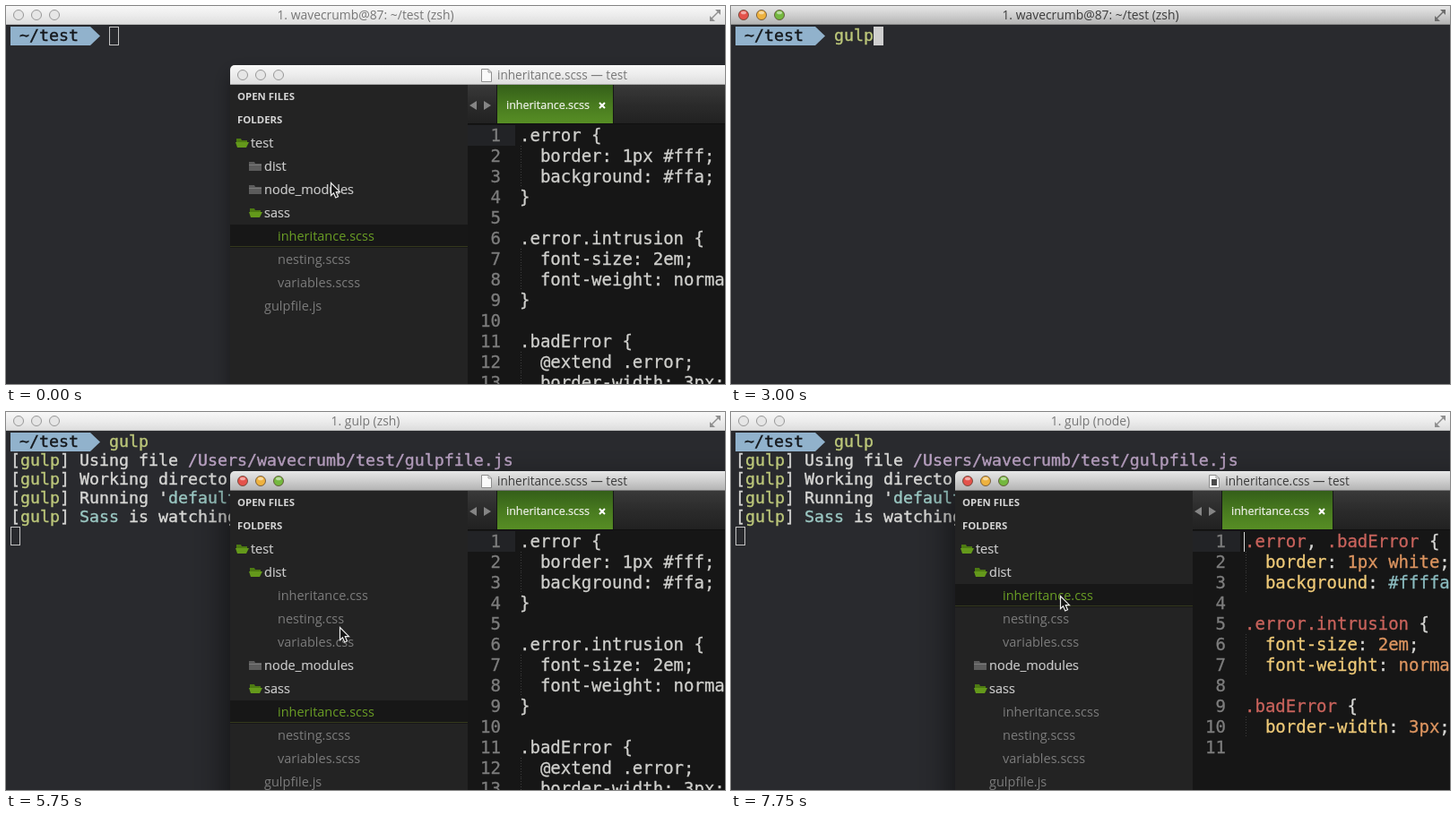
An HTML page with a canvas for the animation above (8 s loop, 802 px wide and 422 px high).

```html
<!DOCTYPE html>
<html lang="en">
<head>
<meta charset="utf-8">
<title>Watching Sass files</title>
<style>
  html, body { margin: 0; width: 100%; height: 100%; overflow: hidden; background: #292a2e; }
  canvas { display: block; }
</style>
</head>
<body>
<canvas id="stage" width="802" height="422"></canvas>
<script>
const W = 802, H = 422, LOOP = 8000, STEP = 250;
const ctx = document.getElementById('stage').getContext('2d');

const SANS = '"Open Sans", "Noto Sans", sans-serif';
const MONO = '"DejaVu Sans Mono", monospace';
const USER = 'wavecrumb';
const C = {
  white: '#d6d6d4', lime: '#bcc77a', mauve: '#bba3c4', teal: '#9ac7c2',
  red: '#c9635c', yellow: '#efca78', orange: '#dd9560', violet: '#b294bb', aqua: '#8bbcc0'
};

const SCSS = `.error {
  border: 1px #fff;
  background: #ffa;
}

.error.intrusion {
  font-size: 2em;
  font-weight: normal;
}

.badError {
  @extend .error;
  border-width: 3px;`;
const NESTING = `table.hl {
  margin: 2em 1; }
  table.hl td.ln {
    text-align: right; }

li {
  font-family: serif;
  font-weight: bold;
  font-size: 1.2em; }
`;
const INHERIT = `.error, .badError {
  border: 1px white;
  background: #ffffaa; }

.error.intrusion {
  font-size: 2em;
  font-weight: normal; }

.badError {
  border-width: 3px; }
`;
const FILES = {
  'inheritance.scss': SCSS, 'nesting.css': NESTING, 'inheritance.css': INHERIT
};

// Pointer path: time, x, y
const POINTER = [
  [[0, 362, 197], [500, 312, 182], [750, 302, 180], [1250, 187, 111], [1500, 181, 106], [2500, 181, 106]],
  [[4750, 420, 300], [5750, 372, 240], [6250, 366, 228], [6750, 366, 226], [7250, 367, 205], [7750, 367, 205]]
];

function rect(x, y, w, h, fill) {
  ctx.fillStyle = fill;
  ctx.fillRect(x, y, w, h);
}

function shade(y, h, ...stops) {
  const g = ctx.createLinearGradient(0, y, 0, y + h);
  stops.forEach((c, i) => g.addColorStop(i / (stops.length - 1), c));
  return g;
}

function poly(points, fill, stroke, width = 1) {
  ctx.beginPath();
  points.forEach(([x, y]) => ctx.lineTo(x, y));
  ctx.closePath();
  if (fill) { ctx.fillStyle = fill; ctx.fill(); }
  if (stroke) { ctx.strokeStyle = stroke; ctx.lineWidth = width; ctx.stroke(); }
}

function line(points, color, width = 1) {
  ctx.beginPath();
  points.forEach(([x, y]) => ctx.lineTo(x, y));
  ctx.strokeStyle = color;
  ctx.lineWidth = width;
  ctx.stroke();
}

// Draws text and returns its width; a thin stroke thickens the strokes a little.
function text(s, x, y, font, color, align = 'left', thick = 0) {
  ctx.font = font;
  ctx.textAlign = align;
  ctx.fillStyle = color;
  ctx.fillText(s, x, y);
  if (thick) {
    ctx.strokeStyle = color;
    ctx.lineWidth = thick;
    ctx.strokeText(s, x, y);
  }
  return ctx.measureText(s).width;
}

function runs(parts, x, y, font, thick) {
  for (const [s, color] of parts) x += text(s, x, y, font, color, 'left', thick);
}

function lights(x, y, active) {
  ['#e4524b', '#eeb23f', '#74b83f'].forEach((c, i) => {
    const cx = x + i * 20;
    ctx.beginPath();
    ctx.arc(cx, y, 5.5, 0, 7);
    ctx.fillStyle = active ? c : '#e6e6e6';
    ctx.fill();
    ctx.lineWidth = 1;
    ctx.strokeStyle = active ? 'rgba(70,45,25,.65)' : '#979797';
    ctx.stroke();
    if (!active) return;
    ctx.beginPath();
    ctx.ellipse(cx, y - 2.5, 3, 1.8, 0, 0, 7);
    ctx.fillStyle = 'rgba(255,255,255,.5)';
    ctx.fill();
  });
}

function barFill(y, h, active) {
  return active ? shade(y, h, '#e7e7e7', '#cecece', '#b1b1b1') : shade(y, h, '#f8f8f8', '#ececec', '#dcdcdc');
}

function cursor(x, y, solid) {
  if (solid) return rect(x, y, 11, 21, '#cfcfcf');
  ctx.strokeStyle = '#c4c4c4';
  ctx.lineWidth = 1;
  ctx.strokeRect(x + .5, y + .5, 10, 20);
}

function terminal(t) {
  const active = t >= 1750 && t < 4500;
  const font = '18.27px ' + MONO;
  rect(0, 0, W, H, '#292a2e');
  rect(0, 0, W, 21, barFill(0, 21, active));
  rect(0, 20, W, 1, active ? '#8d8d8d' : '#bdbdbd');
  lights(14, 10, active);
  const title = t < 3500 ? `1. ${USER}@87: ~/test (zsh)` : t < 7250 ? '1. gulp (zsh)' : '1. gulp (node)';
  text(title, 401, 15, '13.9px ' + SANS, active ? '#3c3c3c' : '#777', 'center');

  const ink = active ? '#6c6c6c' : '#8f8f8f';
  line([[787, 14], [795, 6]], ink, 1.5);
  poly([[791, 4], [797, 4], [797, 10]], ink);
  poly([[785, 11], [785, 17], [791, 17]], ink);

  poly([[5, 23], [94, 23], [105, 33.5], [94, 44], [5, 44]], '#91b2cc');
  text('~/test', 15, 39, font, '#15181c', 'left', .4);

  const typed = t < 2750 ? '' : t < 3000 ? 'gu' : 'gulp';
  text(typed, 115, 39, font, C.lime, 'left', .4);
  if (t < 3500) return cursor(115 + typed.length * 11, 23, active);

  const log = [
    [['Using file ', C.white], [`/Users/${USER}/test/gulpfile.js`, C.mauve]],
    [['Working directory changed to ', C.white], [`/Users/${USER}/test`, C.mauve]],
    [['Running ', C.white], ["'", C.white], ['default', C.teal], ["'...", C.white]],
    [['Sass', C.teal], [' is watching', C.white]]
  ];
  const count = Math.min(4, Math.floor((t - 3500) / STEP));
  log.slice(0, count).forEach((parts, i) => {
    const head = [['[', C.white], ['gulp', C.lime], ['] ', C.white]];
    runs(head.concat(parts), 5, 60 + i * 21, font, .4);
  });
  cursor(5, 44 + count * 21, active);
}

function folder(x, y, open) {
  if (open) {
    poly([[x + 1, y - 5], [x + 6, y - 5], [x + 7, y - 3], [x + 13, y - 3], [x + 13, y], [x + 1, y]], '#4d7a12');
    poly([[x, y - 1], [x + 15, y - 1], [x + 12, y + 5], [x + 2, y + 5]], '#64991b');
  } else {
    poly([[x, y - 5], [x + 6, y - 5], [x + 7, y - 3], [x + 14, y - 3], [x + 14, y + 5], [x, y + 5]], '#5c5c5c');
    rect(x, y - 2, 14, 1, '#7b7b7b');
  }
}

function sidebar(t, selected) {
  rect(250, 88, 265, H - 88, '#232323');
  const head = 'bold 11.4px ' + SANS, font = '14.5px ' + SANS;
  text('OPEN FILES', 258, 105, head, '#d4d4d4');
  text('FOLDERS', 258, 131, head, '#d4d4d4');

  const names = ['inheritance', 'nesting', 'variables'];
  const built = t >= 4500;
  const rows = [['test', 0, true], ['dist', 1, t >= 750]];
  if (built) names.forEach(n => rows.push([n + '.css', 2]));
  rows.push(['node_modules', 1, false], ['sass', 1, true]);
  names.forEach(n => rows.push([n + '.scss', 2]));
  rows.push(['gulpfile.js', 1]);

  rows.forEach(([name, depth, open], i) => {
    const y = 153 + i * 26;
    let x = 273 + depth * 15;
    if (name.endsWith('.css') && t < 4750) x += 18;
    const isFile = open === undefined, on = name === selected;
    if (on) {
      rect(250, y - 13, 265, 26, '#171717');
      rect(250, y + 11, 265, 1, '#34391d');
    }
    if (!isFile) folder(x - 17, y, open);
    text(name, x, y + 5, font, on ? '#6a9d25' : isFile ? '#7c7c7c' : '#cbcbcb', 'left', isFile ? 0 : .2);
  });
}

function highlight(s) {
  const rule = s.match(/^(\s+)([\w-]+)(: )(.*)$/);
  const parts = [];
  const split = (str, pattern, pick) => {
    for (const p of str.split(pattern)) if (p) parts.push([p, pick(p)]);
  };
  if (rule) {
    parts.push([rule[1], C.white], [rule[2], C.yellow], [rule[3], C.white]);
    split(rule[4], /(#?[\w.]+)/, p => p[0] === '#' ? C.aqua : /\w/.test(p) ? C.orange : C.white);
  } else {
    split(s, /(\.?\w+)/, p => p[0] === '.' ? C.red : /\w/.test(p) ? C.violet : C.white);
  }
  return parts;
}

function code(name) {
  const font = '19px ' + MONO, plain = name.endsWith('.scss');
  rect(515, 132, W - 515, H - 132, '#161616');
  rect(515, 133, 53, 23, '#222326');
  FILES[name].split('\n').forEach((s, i) => {
    const y = 151 + i * 23;
    text(String(i + 1), 552, y, font, '#7d7d7d', 'right', .3);
    if (s.startsWith('  ')) {
      for (let d = 0; d < 23; d += 3) rect(574, y - 18 + d, 1, 1, '#3c3c3c');
    }
    runs(plain ? [[s, '#d0d0cd']] : highlight(s), 573, y, font, .3);
  });
  if (!plain) rect(572, 134, 1, 22, '#d8d8d8');
}

function tabs(name) {
  rect(515, 88, W - 515, 44, shade(88, 44, '#393939', '#2b2b2b', '#212121'));
  poly([[517, 111], [525, 106], [525, 116]], '#858585');
  poly([[541, 111], [533, 106], [533, 116]], '#858585');
  const font = '12.5px ' + SANS;
  ctx.font = font;
  const w = ctx.measureText(name).width;
  rect(547, 88, w + 38, 44, '#161616');
  rect(548, 88, w + 36, 44, shade(88, 44, '#345f19', '#487a1f', '#588f25'));
  text(name, 558, 115, font, '#f2f4ee', 'left', .2);
  const x = 558 + w + 14;
  line([[x - 3, 108], [x + 3, 114]], '#fff', 2);
  line([[x + 3, 108], [x - 3, 114]], '#fff', 2);
  rect(515, 131, W - 515, 1, '#101010');
}

function windowPath() {
  ctx.beginPath();
  ctx.roundRect(250, 66, W, H, 5);
}

function editor(t) {
  const active = t >= 500;
  const name = t < 6250 ? 'inheritance.scss' : t < 7250 ? 'nesting.css' : 'inheritance.css';
  ctx.save();
  ctx.shadowColor = active ? 'rgba(0,0,0,.65)' : 'rgba(0,0,0,.4)';
  ctx.shadowBlur = active ? 42 : 20;
  ctx.shadowOffsetY = active ? 18 : 9;
  windowPath();
  ctx.fillStyle = '#222';
  ctx.fill();
  ctx.restore();

  ctx.save();
  windowPath();
  ctx.clip();
  rect(250, 66, W, 22, barFill(66, 22, active));
  rect(250, 87, W, 1, active ? '#777' : '#a9a9a9');
  lights(264, 77, active);
  const font = '13.55px ' + SANS, title = name + ' — test';
  const w = text(title, 620.5, 82, font, active ? '#3a3a3a' : '#777', 'center');
  const x = Math.round(620.5 - w / 2) - 18;
  poly([[x + .5, 70.5], [x + 8, 70.5], [x + 11.5, 74], [x + 11.5, 84.5], [x + .5, 84.5]], '#fafafa', '#8d8d8d');
  line([[x + 8, 70.5], [x + 8, 74], [x + 11.5, 74]], '#999');
  if (name.endsWith('.css')) rect(x + 3, 75, 6, 7, '#4b4b4b');
  sidebar(t, name);
  code(name);
  tabs(name);
  ctx.restore();
}

function pointer(t) {
  const path = POINTER.find(p => t >= p[0][0] && t <= p[p.length - 1][0]);
  if (!path) return;
  let i = path.findIndex(p => p[0] > t);
  if (i < 0) i = path.length - 1;
  const [a, b] = [path[i - 1], path[i]];
  const k = (t - a[0]) / (b[0] - a[0]);
  const x = Math.round(a[1] + (b[1] - a[1]) * k), y = Math.round(a[2] + (b[2] - a[2]) * k);

  if (x < 250) {
    const c = '#d9d9d9';
    line([[x + .5, y - 6], [x + .5, y + 6]], c, 1.3);
    line([[x - 3, y - 8], [x + .5, y - 6], [x + 4, y - 8]], c, 1.2);
    line([[x - 3, y + 8], [x + .5, y + 6], [x + 4, y + 8]], c, 1.2);
    line([[x - 1.5, y + 2.5], [x + 2.5, y + 2.5]], c);
    return;
  }
  const shape = [[0, 0], [0, 14], [3, 11.2], [5.3, 16.5], [8, 15.3], [5.8, 10.2], [10, 10.2]];
  poly(shape.map(([px, py]) => [x + px + .5, y + py + .5]), '#151515', '#eee', 1.2);
}

function draw() {
  const now = performance.now() % LOOP;
  const t = Math.floor(now / STEP) * STEP;
  ctx.lineJoin = 'miter';
  terminal(t);
  if (t < 1750 || t >= 4500) editor(t);
  pointer(t);
  requestAnimationFrame(draw);
}

requestAnimationFrame(draw);
</script>
</body>
</html>
```
